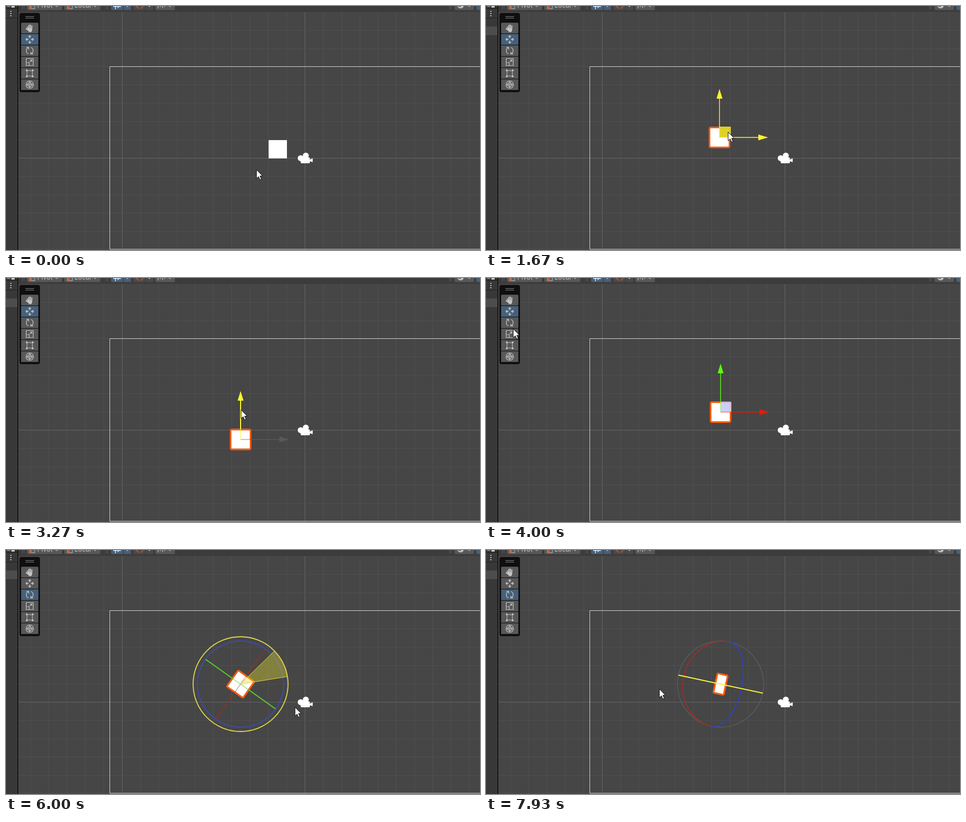
An HTML page for the animation above (8000 ms loop, 879 by 453 pixels).

```html
<!DOCTYPE html>
<html lang="en">
<head>
<meta charset="utf-8">
<title>Scene view transform tools</title>
<style>
html, body { margin: 0; width: 100%; height: 100%; overflow: hidden; background: #464646; }
svg { display: block; width: 100vw; height: 100vh; }
text { font: 12px Inter, Roboto, sans-serif; fill: #c8c8c8; }
</style>
</head>
<body>
<svg viewBox="0 0 879 453">
  <g id="back"></g>
  <g id="gizmo"></g>
  <g id="bars"></g>
  <g id="tools"></g>
  <path id="cursor" d="M0 0V16.2L3.8 12.7L6.4 18.6L9 17.5L6.5 11.7H11.4Z" fill="#fff" stroke="#111" stroke-width="1"/>
</svg>
<script>
const LOOP = 8000, FPS = 15;
const byId = id => document.getElementById(id);
const rect = (x, y, w, h, fill, more = '') =>
  `<rect x="${x}" y="${y}" width="${w}" height="${h}" fill="${fill}" ${more}/>`;
const line = (x1, y1, x2, y2, color, width = 1, more = '') =>
  `<path d="M${x1} ${y1}L${x2} ${y2}" stroke="${color}" stroke-width="${width}" ${more}/>`;
const path = (d, stroke, width = 1.3, fill = 'none') =>
  `<path d="${d}" fill="${fill}" stroke="${stroke}" stroke-width="${width}"/>`;
const ring = (r, color, width) =>
  `<circle r="${r}" fill="none" stroke="${color}" stroke-width="${width}"/>`;
const place = (x, y, body, turn = 0) =>
  `<g transform="translate(${x} ${y}) rotate(${turn})">${body}</g>`;

function drawBack() {
  const step = 33.9;
  let s = rect(0, 0, 879, 453, '#464646');
  for (let i = -15; i < 10; i++)
    s += rect(Math.floor(554.3 + i * step), 11, 1, 442, i % 10 ? '#4f4f4f' : '#656565');
  for (let i = -7; i < 6; i++)
    s += rect(23, Math.floor(282.4 + i * step), 856, 1, i ? '#4f4f4f' : '#656565');
  s += rect(23, 452, 856, 1, '#493f40');
  s += path('M880 112.5H192.5V451.5H880', '#d0d0d0', 1);
  byId('back').innerHTML = s;
}

const camera = place(555, 283,
  '<g fill="#fff"><circle cx="-8.5" cy="-.5" r="5.5"/><circle cx="1" cy="-5.3" r="5.5"/>' +
  '<rect x="-8.5" y="-2" width="17" height="11" rx="1.5"/><path d="M7 3L13.7 -.5V7L7 4.5Z"/></g>');

function drawBars() {
  const grey = '#585858', blue = '#46607c', icon = '#c4c4c4';
  const button = (x, w, fill) => rect(x, -12, w, 19.5, fill, 'rx="2"');
  const caret = x => path(`M${x - 3} -1.5L${x} 1.5L${x + 3} -1.5`, '#a8a8a8', 1.2);
  const grips = x => rect(x, 0, 1, 6, '#5c5c5c') + rect(x + 3, 0, 1, 6, '#5c5c5c');
  const pivot = x => `<rect x="${x}" y="-4" width="9" height="9" fill="none" stroke="${icon}"/>` +
    `<circle cx="${x + 2}" cy="3" r="2.5" fill="#d8603a"/>`;
  let s = rect(23, 0, 856, 11, '#3c3c3c');
  s += grips(30) + button(39, 65, grey) + pivot(44) + '<text x="58" y="3">Pivot</text>' + caret(94);
  s += button(108, 67, grey) + pivot(114) + '<text x="127" y="3">Local</text>' + caret(165);
  s += grips(185) + button(195, 22, blue) + button(218, 14, blue) + caret(225);
  s += path('M203 -2V6M208 -2V4M199 1H213', '#e4e4e4', 1.5);
  s += button(236, 22, '#4a4a4a') + button(259, 14, '#4a4a4a') + caret(266);
  s += path('M241 0L246 4.500M249 4Q255 4 253 -2', '#a05a48', 1.8);
  s += button(277, 36, grey) + path('M282 -2V4M286 -2V2M290 -2V4M294 -2V2', icon, 1.2) + caret(304);
  s += grips(822) + button(832, 36, grey) + caret(859) + button(872, 12, blue);
  s += `<circle cx="843" cy="-1.500" r="6" fill="${icon}"/><circle cx="841" cy="-2" r="3.500" fill="#505050"/>`;
  s += rect(0, 0, 21, 453, '#383838') + rect(0, 0, 21, 5, '#303030') + rect(0, 4, 21, 1, '#202020');
  s += rect(0, 22, 21, 1, '#242424') + rect(2, 0, 6, 2, '#777') + rect(10, 0, 6, 3, icon);
  s += rect(21, 0, 2, 453, '#191919');
  for (const y of [9, 13, 17]) s += rect(8, y, 2, 2, icon);
  byId('bars').innerHTML = s;
}

const C = '#c6c6c6';
const icons = [
  path('M-4.500 -3L-2.500 2M-1.500 -6V1M1.200 -6.500V1M4 -5L3.500 2M-7 0L-3 4.500', C, 1.9) +
    `<path d="M-4 1L4.500 0Q5 7 2 7.500H-1.500Z" fill="${C}"/>`,
  path('M0 -7V-2M0 7V2M-7 0H-2M7 0H2M-2.500 -4.500L0 -7L2.500 -4.500M-2.500 4.500L0 7L2.500 4.500' +
    'M-4.500 -2.500L-7 0L-4.500 2.500M4.500 -2.500L7 0L4.500 2.500', C),
  path('M-2 6A6.300 6.300 0 0 1 -2 -6M2 -6A6.300 6.300 0 0 1 2 6M-6 -6H-2V-2M6 6H2V2', C),
  path('M-6.500 -6.500H6.500V6.500H-6.500ZM-6.500 1H-1V6.500M0 0L4 -4M0.500 -4H4V-0.500', C, 1.2),
  path('M-5 -5H5V5H-5Z', C, 1) +
    [[-1, -1], [1, -1], [-1, 1], [1, 1]].map(([x, y]) => rect(x * 5.5 - 1.5, y * 5.5 - 1.5, 3, 3, C)).join(''),
  ring(7, C, 1.1) + path('M0 -6V6M-6 0H6M-2 -4L0 -6L2 -4M-2 4L0 6L2 4M-4 -2L-6 0L-4 2M4 -2L6 0L4 2M-3 -3H3V3H-3Z', C, 1)
];

function drawTools(active, selected) {
  let s = rect(25, 13, 38, 147, '#0f0f0f', 'rx="4"');
  s += rect(36, 19, 16, 1, '#858585') + rect(36, 22, 16, 1, '#858585');
  icons.forEach((icon, i) => {
    s += rect(28, 31 + 21 * i, 32, 20, i === active ? '#46607c' : '#585858', i ? '' : 'rx="2"');
    s += place(44, 41 + 21 * i, icon);
  });
  if (selected) s += rect(0, 38, 21, 16, '#4d4d4d');
  byId('tools').innerHTML = s;
}

// Keys are [step, x, y], one step being 1/15 s.
const cursorKeys = [
  [0, 464.5, 304], [5, 499.5, 273], [8, 499.5, 273], [12, 520, 256], [17, 520, 256],
  [26, 449, 234], [29, 482, 245], [31, 482, 245], [39, 484, 245], [42, 436, 190],
  [44, 436, 189], [53, 436, 194], [56, 379, 180], [58, 170, 19], [60, 50.5, 94.5],
  [63, 47, 83], [64, 47, 83], [69, 484, 176], [73, 497, 188], [80, 452, 143],
  [81, 452, 143], [90, 536, 292], [91, 535, 289], [94, 522, 212], [104, 474.5, 259],
  [105, 474.5, 259], [111, 320.5, 258], [115, 455, 258], [118, 411, 258], [119, 321.5, 258]
];
const boxKeys = [
  [17, 504, 266], [21, 392, 248], [23, 408, 235], [25, 433, 244], [31, 433, 244],
  [34, 564, 244], [38, 436, 244], [39, 435, 244], [44, 435, 244], [46, 435, 212],
  [50, 435, 316], [53, 435, 249]
];
const drags = [
  { from: 17, to: 26, mode: 'xy', grip: [16, -10] },
  { from: 31, to: 39, mode: 'x', grip: [49, 1] },
  { from: 44, to: 53, mode: 'y', grip: [1, -55] },
  { from: 73, to: 94, mode: 'roll' },
  { from: 106, to: 120, mode: 'yaw' }
];

function at(keys, k) {
  const n = keys.findIndex(key => key[0] > k);
  if (n < 0) return keys[keys.length - 1].slice(1);
  if (n === 0) return keys[0].slice(1);
  const [a, x, y] = keys[n - 1], [b, u, v] = keys[n];
  const p = (k - a) / (b - a), e = p * p * (3 - 2 * p);
  return [x + (u - x) * e, y + (v - y) * e];
}

function square(scale, outlined) {
  const w = 34 * scale;
  const edge = outlined
    ? rect(-w / 2 - 1.5, -18.5, w + 3, 37, 'none', 'rx="2.5" stroke="#ff5c0a" stroke-width="3"') : '';
  return rect(-w / 2, -17, w, 34, '#fff') + edge;
}

// A handle is softer where it crosses the square.
const spoke = (from, to, color, width, soft) =>
  line(from, 0, -soft, 0, color, width) + line(-soft, 0, soft, 0, color, width, 'opacity=".5"') +
  line(soft, 0, to, 0, color, width);

function arrow(color, width) {
  return line(0, 0, 19, 0, color, width, 'opacity=".5"') + line(19, 0, 73, 0, color, width) +
    `<path d="M72 -5.500L90 0L72 5.500Z" fill="${color}"/>`;
}

function moveGizmo(mode) {
  const hot = '#fbf62c', dim = '#585858';
  const color = (axis, rest) => !mode ? rest : mode.includes(axis) ? hot : dim;
  let s = '';
  if (!mode) s += rect(0, -19, 20, 19, '#c9c9f4', 'opacity=".9"');
  if (mode === 'xy') s += rect(0, -19.5, 20.5, 19.5, '#ddd01e', 'stroke="#ece336" opacity=".95"');
  s += place(0, 0, arrow(color('x', '#dc1e0c'), mode === 'x' ? 2 : 1.4));
  return s + place(0, 0, arrow(color('y', '#5cfa14'), mode === 'y' ? 2 : 1.4), -90);
}

function sector(roll) {
  const start = -44.5 * Math.PI / 180, end = start + roll * Math.PI / 180;
  const tip = a => `${88 * Math.cos(a)} ${88 * Math.sin(a)}`;
  return `<path d="M0 0L${tip(start)}A88 88 0 0 ${roll > 0 ? 1 : 0} ${tip(end)}Z" ` +
    'fill="#e8dc30" fill-opacity=".38" stroke="#ddd340" stroke-width="1"/>';
}

function rotateGizmo(mode, roll, yaw, hover) {
  if (mode === 'yaw') {
    const half = (r, side, color) => path(`M0 -80A${Math.max(r, .1)} 80 0 0 ${side} 0 80`, color, 1.7);
    return ring(80, '#5b5b5b', 1.5) + place(0, 0,
      half(80 * Math.sin(yaw), 0, '#a52c28') + half(80 * Math.cos(yaw), 1, '#2844d0') +
      line(-80, 0, 80, 0, '#f8f23c', 2), roll);
  }
  const rolling = mode === 'roll';
  const s = ring(80, rolling ? '#3c4cac' : '#2a40d4', 1.8) +
    place(0, 0, spoke(-79.5, 79.5, '#a62a24', 1.3, 20), roll - 90) +
    place(0, 0, spoke(-79.5, 79.5, '#5cd02c', hover ? 2.8 : 1.9, 20), roll);
  return s + (rolling ? sector(roll) : '') + ring(88, rolling ? '#dcd44c' : '#989898', 1.8);
}

function render(k) {
  const drag = drags.find(d => k >= d.from && k <= d.to);
  const mode = drag ? drag.mode : '';
  const selected = k >= 7, rotating = k >= 63;
  const [bx, by] = at(boxKeys, k);
  let [cx, cy] = at(cursorKeys, k);
  if (drag && drag.grip) [cx, cy] = [bx + drag.grip[0], by + drag.grip[1]];

  // Rolling follows the pointer along the ring's tangent at the grab point.
  const [rx, ry] = at(cursorKeys, Math.min(k, 94));
  const roll = k < 73 ? 0 : (rx - 497 + ry - 188) * .247;
  const yaw = mode === 'yaw' ? Math.max(0, 474.5 - cx) * .395 * Math.PI / 180 : 0;

  let s = place(bx, by, square(Math.cos(yaw), selected), roll) + camera;
  if (rotating) s += place(bx, by, rotateGizmo(mode, roll, yaw, k >= 101));
  else if (selected) s += place(bx, by, moveGizmo(mode));
  byId('gizmo').innerHTML = s;
  drawTools(rotating ? 2 : 1, selected);
  byId('cursor').setAttribute('transform', `translate(${cx} ${cy})`);
}

let shown = -1;
function tick() {
  const t = performance.now() % LOOP;
  const k = Math.min(119, Math.floor((t + 4) * FPS / 1000));
  if (k !== shown) render(shown = k);
  requestAnimationFrame(tick);
}

drawBack();
drawBars();
tick();
</script>
</body>
</html>
```
